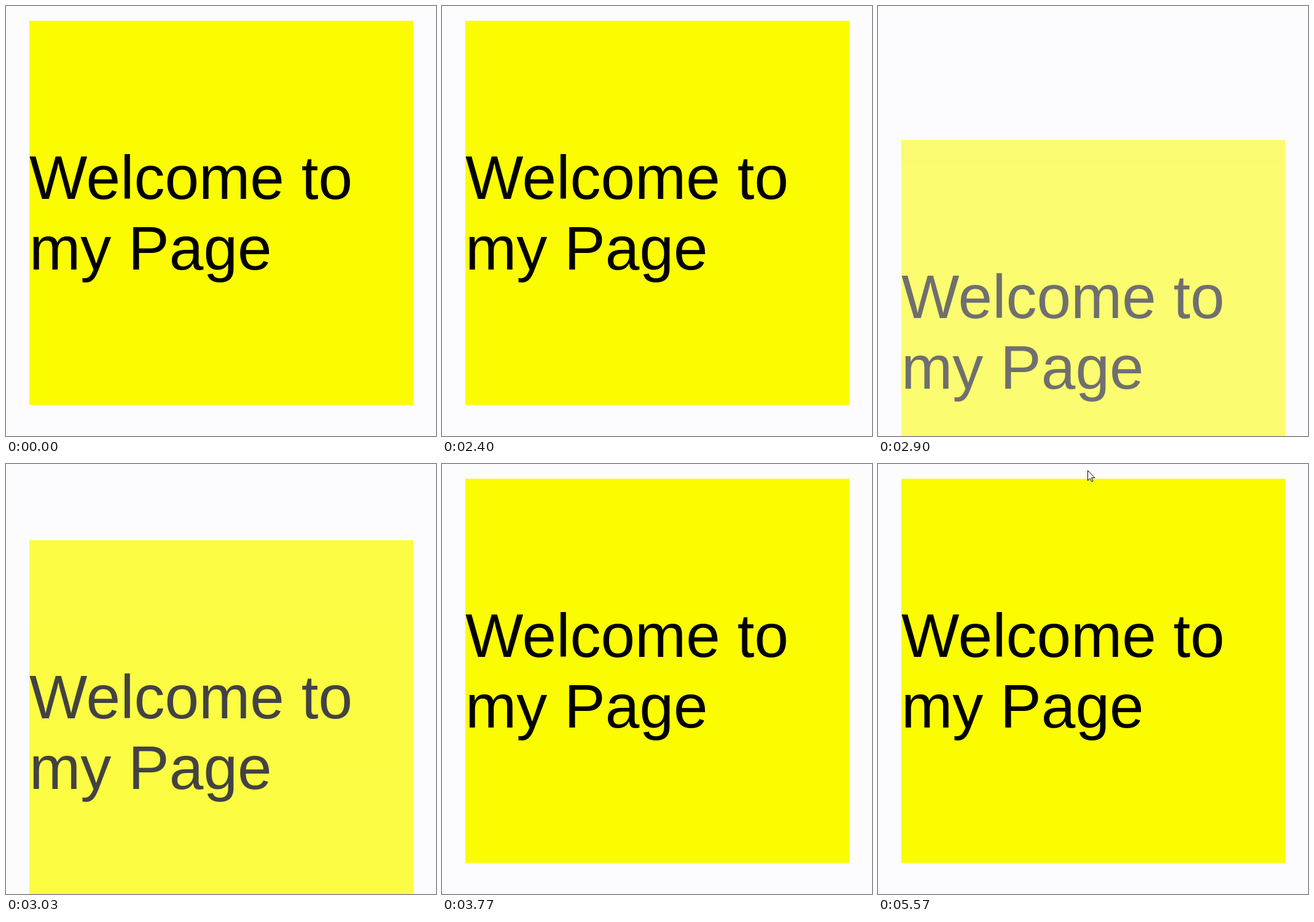
These frames come from a looping animation (700 by 700 pixels, 5630 ms). An HTML page:

```html
<!DOCTYPE html>
<html lang="en">
<head>
<meta charset="utf-8">
<title>Welcome banner</title>
<style>
  html, body { margin: 0; width: 100%; height: 100%; overflow: hidden; background: #fcfcff; }
  svg { display: block; width: 100vw; height: 100vh; }
  text { font: 100px "Liberation Sans", Arial, sans-serif; }
</style>
</head>
<body>
<svg viewBox="0 0 700 700">
  <g id="banner">
    <rect x="38" y="24" width="625" height="625.5" fill="#fcfc00"/>
    <text x="38" y="314">Welcome to</text>
    <text x="38" y="429">my Page</text>
  </g>
  <path id="cursor" d="M341.5 10.5V27L345.3 23.4L347.8 28.7L350 27.7L347.6 22.5H352.8Z"
        fill="#fff" stroke="#000" stroke-width="1"/>
</svg>
<script>
  const LOOP = 5630;
  const TICK = 100 / 3;
  const RELOAD = 2770;       // the page cuts into the running entrance here
  const RISE_START = 2471;
  const FADE_START = 2570;
  const ENTER_TIME = 850;
  const TRAVEL = 625;
  const CURSOR_AT = 5570;

  const banner = document.getElementById("banner");
  const cursor = document.getElementById("cursor");

  // cubic-bezier(0, 0, .58, 1), solved by bisection
  function easeOut(x) {
    if (x >= 1) return 1;
    let lo = 0, hi = 1;
    for (let i = 0; i < 24; i++) {
      const u = (lo + hi) / 2;
      if (u * u * (1.74 - 0.74 * u) < x) lo = u; else hi = u;
    }
    return lo * lo * (3 - 2 * lo);
  }

  function draw(t) {
    const stepped = Math.floor((t + 5) / TICK) * TICK;
    const progress = start => t < RELOAD ? 1 : easeOut((stepped - start) / ENTER_TIME);
    const drop = Math.round((1 - progress(RISE_START)) * TRAVEL);
    banner.setAttribute("transform", `translate(0 ${drop})`);
    banner.setAttribute("opacity", progress(FADE_START).toFixed(4));
    cursor.setAttribute("visibility", t >= CURSOR_AT ? "visible" : "hidden");
  }

  const start = performance.now();
  function frame() {
    draw((performance.now() - start) % LOOP);
    requestAnimationFrame(frame);
  }
  frame();
</script>
</body>
</html>
```
